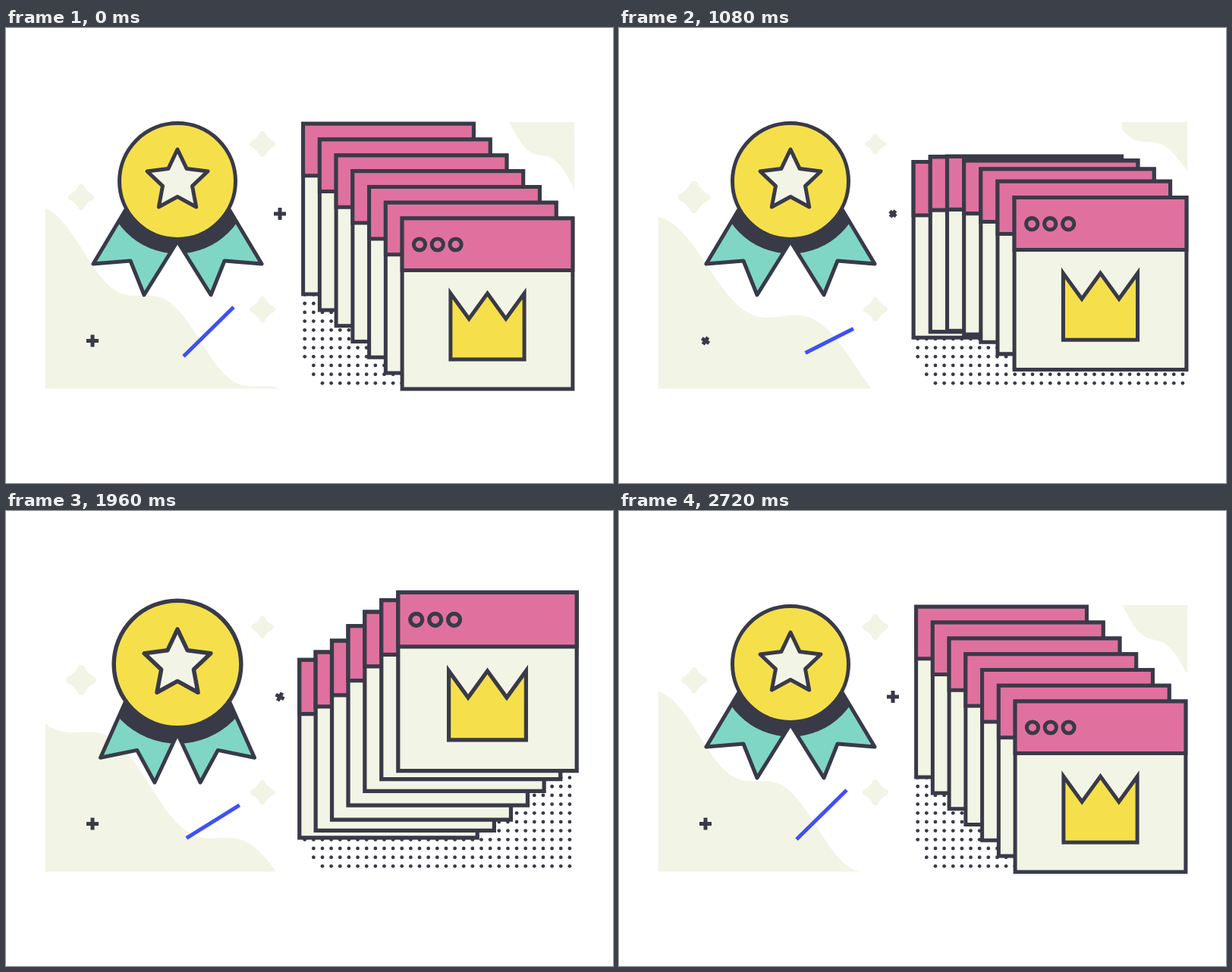
Animation of 800 by 600 pixels, one loop 2.76 s. Source, as an HTML page with a canvas:

```html
<!DOCTYPE html>
<html lang="en">
<head>
<meta charset="utf-8">
<title>Award and windows</title>
<style>
  html, body { margin: 0; width: 100%; height: 100%; overflow: hidden; background: #fff; }
  canvas { display: block; }
</style>
</head>
<body>
<canvas id="stage" width="800" height="600"></canvas>
<script>
const c = document.getElementById('stage').getContext('2d');
const LOOP = 2760, TAU = Math.PI * 2;
const DARK = '#393a48', CREAM = '#f2f4e5', PINK = '#e0719e',
      YELLOW = '#f5e04b', TEAL = '#80d6c4', BLUE = '#3f50f5';

const { sin, cos, PI } = Math;
const span = (t, from, to) => Math.min(1, Math.max(0, (t - from) / (to - from)));
const sineEase = u => (1 - cos(PI * u)) / 2;
const softOut = u => u + .25 * u * (1 - u);
const quadOut = u => 1 - (1 - u) ** 2;
const bump = (t, from, to) => sin(PI * span(t, from, to)) ** 2;
const radians = degrees => degrees * PI / 180;

function at(x, y, scale, angle, draw) {
  c.save();
  c.translate(x, y);
  c.rotate(radians(angle));
  c.scale(scale, scale);
  draw();
  c.restore();
}

function paint(fill, stroke = DARK, width = 5) {
  if (fill) { c.fillStyle = fill; c.fill(); }
  if (stroke) { c.strokeStyle = stroke; c.lineWidth = width; c.stroke(); }
}

function poly(points) {
  c.beginPath();
  points.forEach(([x, y]) => c.lineTo(x, y));
  c.closePath();
}

function circle(x, y, r) {
  c.beginPath();
  c.arc(x, y, r, 0, TAU);
}

function box(x, y, w, h, fill) {
  c.beginPath();
  c.rect(x, y, w, h);
  paint(fill);
}

function line(x1, y1, x2, y2, color, cap = 'butt') {
  c.beginPath();
  c.moveTo(x1, y1);
  c.lineTo(x2, y2);
  c.lineCap = cap;
  paint(null, color);
}

// Fills the area between the wavy edge y = height(x) and a base, cropped to a box
function blob(left, top, right, bottom, base, height) {
  c.save();
  c.beginPath();
  c.rect(left, top, right - left, bottom - top);
  c.clip();
  c.beginPath();
  c.moveTo(left, base);
  for (let x = left; x <= right + 3; x += 3) c.lineTo(x, height(x));
  c.lineTo(right + 3, base);
  paint(CREAM, null);
  c.restore();
}

function background(t, p) {
  const phase = TAU * t / LOOP;
  const slope = .72 - .09 * sin(phase) + .05 * cos(2 * phase);
  blob(51.5, 200, 374.5, 475.5, 600, x =>
    378 + slope * (x - 211) +
    (20 + 6 * p) * cos(TAU * (x - 140) / (155 + 45 * p) + 2 * phase + .6 * p));
  blob(663, 124, 749, 213, 90, x =>
    124 + 8 * sin(phase) + (1.03 - .65 * sin(phase)) * (x - 663) +
    (12 - 4 * p) * sin(TAU * (x - 663) / 86 + .7 * p));
}

function sparkle(x, y, scale) {
  at(x, y, scale, 0, () => {
    c.beginPath();
    c.moveTo(0, -13);
    for (let i = 0; i < 4; i++) {
      const a = i * PI / 2;
      c.quadraticCurveTo(5.7 * sin(a + PI / 4), -5.7 * cos(a + PI / 4), 13 * cos(a), 13 * sin(a));
    }
    c.closePath();
    paint(CREAM, CREAM, 8);
  });
}

function plus(x, y, u) {
  const r = 8 - 3 * u;
  at(x, y, 1, 45 * u, () => {
    line(-r, 0, r, 0, DARK);
    line(0, -r, 0, r, DARK);
  });
}

function dots() {
  c.fillStyle = DARK;
  for (let row = 0; row < 12; row++) {
    const first = Math.max(0, 2 - Math.ceil(row / 2));
    for (let col = first; col <= 30; col++) {
      circle(393.7 + col * 11.64, 468.3 - row * 11.67, 2.4);
      c.fill();
    }
  }
}

function streak(t) {
  const head = quadOut(span(t, 1160, 1480)), tail = quadOut(span(t, 1360, 1760));
  if (head > tail) {
    line(430 - 118 * head, 239 + 117 * head, 430 - 118 * tail, 239 + 117 * tail, DARK, 'round');
  }
}

function ribbon(side, angle, shade) {
  c.save();
  c.scale(side, 1);
  c.save();
  c.translate(13, 36);
  c.rotate(radians(angle));
  poly([[-124, 73], [-75, 69], [-57, 114], [-1, 24], [-69, -19]]);
  c.restore();
  paint(TEAL, null);
  const shadow = new Path2D();
  shadow.arc(0, 0, shade, 0, TAU);
  c.save();
  c.clip();
  c.fillStyle = DARK;
  c.fill(shadow);
  c.restore();
  paint(null);
  c.restore();
}

function medal(t) {
  const start = t < LOOP / 2 ? 40 : 1510;
  const scale = 1 + .15 * bump(t, start, start + 640);
  const u = span(t, start, start + 760);
  const angle = -12 * sin(PI * u) * cos(8.8 * (u - .487));
  at(226, 202, 1, 0, () => {
    ribbon(1, angle, 95.5 * scale);
    ribbon(-1, angle, 95.5 * scale);
  });
  at(226, 202, scale, 0, () => {
    circle(0, 0, 76.5);
    paint(YELLOW);
    poly(Array.from({ length: 10 }, (_, i) => {
      const r = i % 2 ? 20.5 : 42, a = i * TAU / 10;
      return [r * sin(a), -r * cos(a)];
    }));
    paint(CREAM);
  });
}

function browserFace() {
  for (let i = 0; i < 3; i++) {
    circle(-89.5 + 23.8 * i, -78, 7.6);
    paint(null);
  }
  const spikes = [-2, -1, 0, 1, 2].map(i => [24.3 * i, i % 2 ? 20 : -13.5]);
  poly([...spikes, [48.6, 73.5], [-48.6, 73.5]]);
  paint(YELLOW);
}

// Height of the stack's swing, 0 at rest and 1 when fanned
function lift(t) {
  if (t < 650) return sineEase(span(t, 0, 650));
  if (t < 1240) return 1 - softOut(span(t, 650, 1200));
  if (t < 1835) return softOut(span(t, 1290, 1835));
  return 1 - sineEase(span(t, 1835, 2480));
}

function browsers(t) {
  for (let i = 0; i < 7; i++) {
    const p = lift(t - 40 * (6 - i));
    const y = 238.7 + 20.8 * i + (90 - 40.4 * i) * p;
    at(504 + 21.75 * i, y, 1 + .052 * p, 0, () => {
      box(-112.4, -112.4, 224.8, 224.8, CREAM);
      box(-112.4, -112.4, 224.8, 68.4, PINK);
      if (i === 6) browserFace();
    });
  }
}

function draw(t) {
  const p = bump(t, 0, LOOP);
  c.fillStyle = '#fff';
  c.fillRect(0, 0, 800, 600);
  c.lineJoin = 'round';
  background(t, p);
  sparkle(338, 153, 1 - .22 * p);
  sparkle(338, 371, 1 - .06 * p);
  sparkle(99, 223, 1 + .28 * p);
  plus(114, 412.5, bump(t, 0, 1640));
  plus(361, 245, p);
  line(234 - 10 * p + 26 * p * p, 433 + 3 * p - 9 * p * p,
       300 + 9 * quadOut(p), 368 + 32 * p, BLUE);
  dots();
  streak(t);
  medal(t);
  c.lineJoin = 'miter';
  browsers(t);
}

function frame() {
  draw(performance.now() % LOOP);
  requestAnimationFrame(frame);
}
frame();
</script>
</body>
</html>
```
